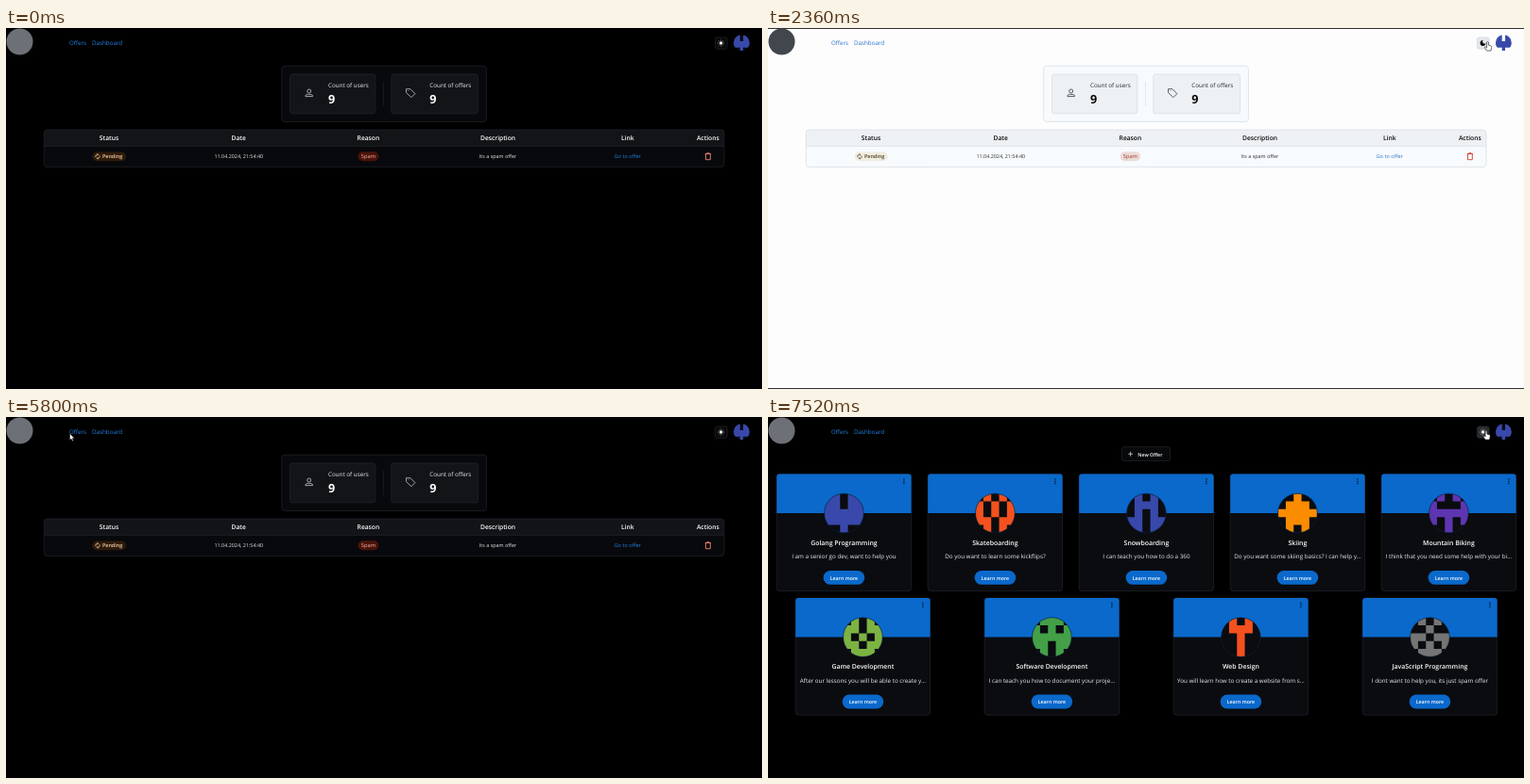
An HTML page with a canvas for the animation above (8 s loop, 800 by 383 pixels).

```html
<!DOCTYPE html>
<html>
<head>
<meta charset="utf-8">
<style>
html, body { margin: 0; width: 100%; height: 100%; overflow: hidden; background: #000; }
canvas { display: block; width: 800px; height: 383px; }
</style>
</head>
<body>
<canvas id="stage"></canvas>
<script>
const stage = document.getElementById('stage');
const c = stage.getContext('2d');
const dpr = window.devicePixelRatio || 1;
stage.width = 800 * dpr;
stage.height = 383 * dpr;

const LOOP = 8000, LIGHT_AT = 2360, DARK_AT = 4320, OFFERS_AT = 6000, AVATARS_AT = 6240;

const dark = {
  page: '#000', box: '#08090c', card: '#121418', line: '#23262c', text: '#e9ebee', strong: '#fff',
  link: '#2583e6', logo: '#6d7077', icon: '#c6c9ce', hover: '#2a2d32', button: '#08090b',
  pendBg: '#2f1b0a', pend: '#f5d6b2', spamBg: '#4b130b', spam: '#f3b3a2', trash: '#ee8371', avatar: '#0a0c10'
};
const light = {
  page: '#fdfdfe', box: '#f8fbfd', card: '#eef1f4', line: '#d3dce3', text: '#24292f', strong: '#08090b',
  link: '#2a72c8', logo: '#42474d', icon: '#33383e', hover: '#e3e6ea', button: '#f4f6f8',
  pendBg: '#efece1', pend: '#4a3d18', spamBg: '#ecdcd9', spam: '#9d3a2e', trash: '#cb3b2b', avatar: '#fff'
};

// Left three columns of each 5x5 mirrored pattern, row by row
const offers = [
  ['Golang Programming', 'I am a senior go dev, want to help you', '#3949ab', '110 110 111 111 001'],
  ['Skateboarding', 'Do you want to learn some kickflips?', '#f4511e', '010 101 101 110 010'],
  ['Snowboarding', 'I can teach you how to do a 360', '#3949ab', '010 011 010 110 110'],
  ['Skiing', 'Do you want some skiing basics? I can help y...', '#fb8c00', '001 011 111 011 010'],
  ['Mountain Biking', 'I think that you need some help with your bi...', '#5e35b1', '010 100 111 101 001'],
  ['Game Development', 'After our lessons you will be able to create y...', '#7cb342', '010 110 101 110 011'],
  ['Software Development', 'I can teach you how to document your proje...', '#43a047', '011 101 111 110 010'],
  ['Web Design', 'You will learn how to create a website from s...', '#f4511e', '010 011 001 001 001'],
  ['JavaScript Programming', 'I dont want to help you, its just spam offer', '#757575', '010 001 110 101 011']
];

// Cursor: time, x, y of the tip
const path = [
  [2200, 761.5, 14.5], [3560, 761.5, 14.5], [3640, 757, 15], [4360, 757, 15], [4960, 153, 37],
  [5240, 68, 20], [5720, 68, 20], [5800, 67.5, 17.5], [5920, 67.5, 17.5], [6040, 71.5, 20],
  [6240, 71.5, 20], [6760, 640, 50], [7200, 769, 12], [7520, 760, 14.5], [8000, 760, 14.5]
];

function text(s, x, y, size, color, weight = 400, align = 'center') {
  c.font = `${weight} ${size}px "Open Sans", "Noto Sans", sans-serif`;
  c.textRendering = 'geometricPrecision';
  c.textAlign = align;
  c.fillStyle = color;
  c.fillText(s, x, y);
}

function box(x, y, w, h, r, fill, line) {
  c.beginPath();
  c.roundRect(x, y, w, h, r);
  if (fill) { c.fillStyle = fill; c.fill(); }
  if (line) { c.strokeStyle = line; c.lineWidth = 0.7; c.stroke(); }
}

function disc(x, y, r, fill) {
  c.beginPath();
  c.arc(x, y, r, 0, 7);
  c.fillStyle = fill;
  c.fill();
}

function shape(d, x, y, line, width = 0.8, fill) {
  c.save();
  c.translate(x, y);
  const p = new Path2D(d);
  if (fill) { c.fillStyle = fill; c.fill(p); }
  c.strokeStyle = line;
  c.lineWidth = width;
  c.lineJoin = 'round';
  c.stroke(p);
  c.restore();
}

function avatar(x, y, r, [, , color, rows], bg, loaded = true) {
  disc(x, y, r, bg);
  if (!loaded) return;
  c.save();
  c.clip();
  c.beginPath();
  const u = r * 2 / 5;
  rows.split(' ').forEach((row, j) => {
    for (let i = 0; i < 5; i++)
      if (row[i < 3 ? i : 4 - i] === '1') c.rect(x - r + i * u, y - r + j * u, u, u);
  });
  c.fillStyle = color;
  c.fill();
  c.restore();
}

function header(p, hover) {
  disc(14.5, 14.5, 14, p.logo);
  text('Offers', 67, 18.3, 6.2, p.link, 400, 'left');
  text('Dashboard', 91, 18.3, 6.25, p.link, 400, 'left');
  box(750.4, 9.9, 12.8, 12.4, 2, hover ? p.hover : p.button, p.line);
  if (p === light) {
    disc(756.5, 16, 2.9, p.strong);
    disc(758.2, 14.6, 2.1, p.hover);
  } else {
    disc(756.6, 16, 1.7, p.strong);
    for (let i = 0; i < 8; i++) {
      const a = i * Math.PI / 4;
      disc(756.6 + 3 * Math.cos(a), 16 + 3 * Math.sin(a), 0.45, p.strong);
    }
  }
  avatar(778.4, 15.7, 8.5, offers[0], p.avatar);
}

function stat(x, w, label, p) {
  box(x, 49, w, 41.8, 2.5, p.card, p.line);
  text(label, x + 40.5, 63.4, 6.27, p.text, 400, 'left');
  text('9', x + 40.5, 80.2, 12.6, p.strong, 700, 'left');
}

function dashboard(p) {
  box(291.8, 40.2, 216.6, 59.2, 3, p.box, p.line);
  stat(300.5, 90.4, 'Count of users', p);
  stat(407.8, 91.8, 'Count of offers', p);
  c.fillStyle = p.line;
  c.fillRect(399.3, 57, 0.6, 26);
  shape('M2 -2A2 2 0 1 1 -2 -2A2 2 0 1 1 2 -2ZM-3.8 3.6V2.8C-3.8 .9 3.8 .9 3.8 2.8V3.6Z', 320.7, 69, p.icon);
  shape('M-4.7 -4.3H-.3L4.7 .7L.7 4.7L-4.7 -.5ZM-2.4 -2.5V-2', 428.2, 69, p.icon);

  box(40.3, 108, 719.6, 39.4, 3, p.box);
  box(40.3, 108, 719.6, 17.2, [3, 3, 0, 0], p.card);
  c.fillStyle = p.line;
  c.fillRect(40.3, 125, 719.6, 0.6);
  box(40.3, 108, 719.6, 39.4, 3, null, p.line);
  [['Status', 109], ['Date', 246.2], ['Reason', 383.4], ['Description', 520.5], ['Link', 657.7], ['Actions', 742.8]]
    .forEach(([s, x]) => text(s, x, 119.4, 6.7, p.strong, 600));

  box(91.5, 131.6, 35.4, 9.6, 4.8, p.pendBg);
  shape('M-2 .9A2.1 2.1 0 0 1 .6 -2M-.5 -2.6L.7 -2L-.1 -1M2 -.9A2.1 2.1 0 0 1 -.6 2M.5 2.6L-.7 2L.1 1', 97, 136.3, p.pend, 0.75);
  text('Pending', 102, 138.4, 5.4, p.pend, 600, 'left');
  text('11.04.2024, 21:54:40', 246.3, 138.4, 5.4, p.text);
  box(372.6, 131.3, 21.6, 10, 5, p.spamBg);
  text('Spam', 383.4, 138.3, 5.7, p.spam, 500);
  text('Its a spam offer', 520.5, 138.4, 5.42, p.text);
  text('Go to offer', 657.7, 138.4, 5.6, p.link);
  shape('M-3.2 -2.7H3.2M-1.2 -2.8V-3.6H1.2V-2.8M-2.4 -2.6V3.4H2.4V-2.6', 742.9, 136.3, p.trash, 0.9);
}

function offerCard(o, x, y, p, loaded) {
  const mid = x + 71.2;
  box(x, y, 142.4, 124.2, 3, p.avatar, p.line);
  box(x, y, 142.4, 41.6, [3, 3, 0, 0], '#0a69cb');
  for (let i = -1; i < 2; i++) disc(x + 134.7, y + 7.8 + i * 2.3, 0.7, '#05080d');
  avatar(mid, y + 41.6, 20.8, o, p.avatar, loaded);
  c.beginPath();
  c.arc(mid, y + 41.6, 20.8, 0, 7);
  c.strokeStyle = '#0c2440';
  c.lineWidth = 0.6;
  c.stroke();
  text(o[0], mid, y + 75.1, 6.9, p.strong, 600);
  text(o[1], mid, y + 89.8, 6.27, p.text);
  box(mid - 21.8, y + 102.6, 43.6, 14.8, 7.4, '#0a69cb');
  text('Learn more', mid, y + 112.1, 5.3, '#fff', 600);
}

function offersPage(p, t) {
  box(374.4, 31.7, 51.2, 14.8, 2.5, p.button, p.line);
  shape('M-2.4 0H2.4M0 -2.4V2.4', 383.6, 39.2, p.text, 0.7);
  text('New Offer', 391.3, 41.5, 5.3, p.strong, 600, 'left');
  offers.forEach((o, i) => {
    const x = i < 5 ? 9.2 + i * 160 : 29.2 + (i - 5) * 200;
    offerCard(o, x, i < 5 ? 60.4 : 192, p, i === 0 || t >= AVATARS_AT);
  });
}

function cursorAt(t) {
  if (t < path[0][0]) return null;
  const i = path.findIndex(k => k[0] > t);
  const [t0, x0, y0] = path[i - 1], [t1, x1, y1] = path[i];
  const k = (t - t0) / (t1 - t0), e = k * k * (3 - 2 * k);
  return [x0 + (x1 - x0) * e, y0 + (y1 - y0) * e];
}

function cursor([x, y], hand) {
  if (hand)
    shape('M-.9 .6Q0 -.6 .9 .6V3.6L3.6 4.4Q4.4 4.8 4.2 6L3.5 9.6H-1L-3 6.4Q-3 5 -1.8 5.6L-.9 6.4Z', x, y, '#111', 0.6, '#fff');
  else
    shape('M0 0V7L1.6 5.6L2.7 8.1L3.8 7.6L2.7 5.2H4.9Z', x, y, '#111', 0.5, '#fff');
}

function draw(t) {
  const p = t >= LIGHT_AT && t < DARK_AT ? light : dark;
  const pos = cursorAt(t);
  const hover = pos && pos[0] > 750 && pos[0] < 763.5 && pos[1] > 10 && pos[1] < 22.5;
  const onLink = pos && pos[1] < 24 && pos[0] > 69 && pos[0] < 123 && t > 5920;
  c.setTransform(dpr, 0, 0, dpr, 0, 0);
  c.fillStyle = p.page;
  c.fillRect(0, 0, 800, 383);
  if (p === light) {
    c.fillStyle = '#2c2e31';
    c.fillRect(0, 0, 800, 1);
    c.fillRect(0, 382, 800, 1);
  }
  header(p, hover);
  if (t < OFFERS_AT) dashboard(p);
  else offersPage(p, t);
  if (pos) cursor(pos, hover || onLink);
}

const start = performance.now();
function tick() {
  const t = (performance.now() - start) % LOOP;
  draw(Math.floor(t / 40) * 40);
  requestAnimationFrame(tick);
}
tick();
</script>
</body>
</html>
```
